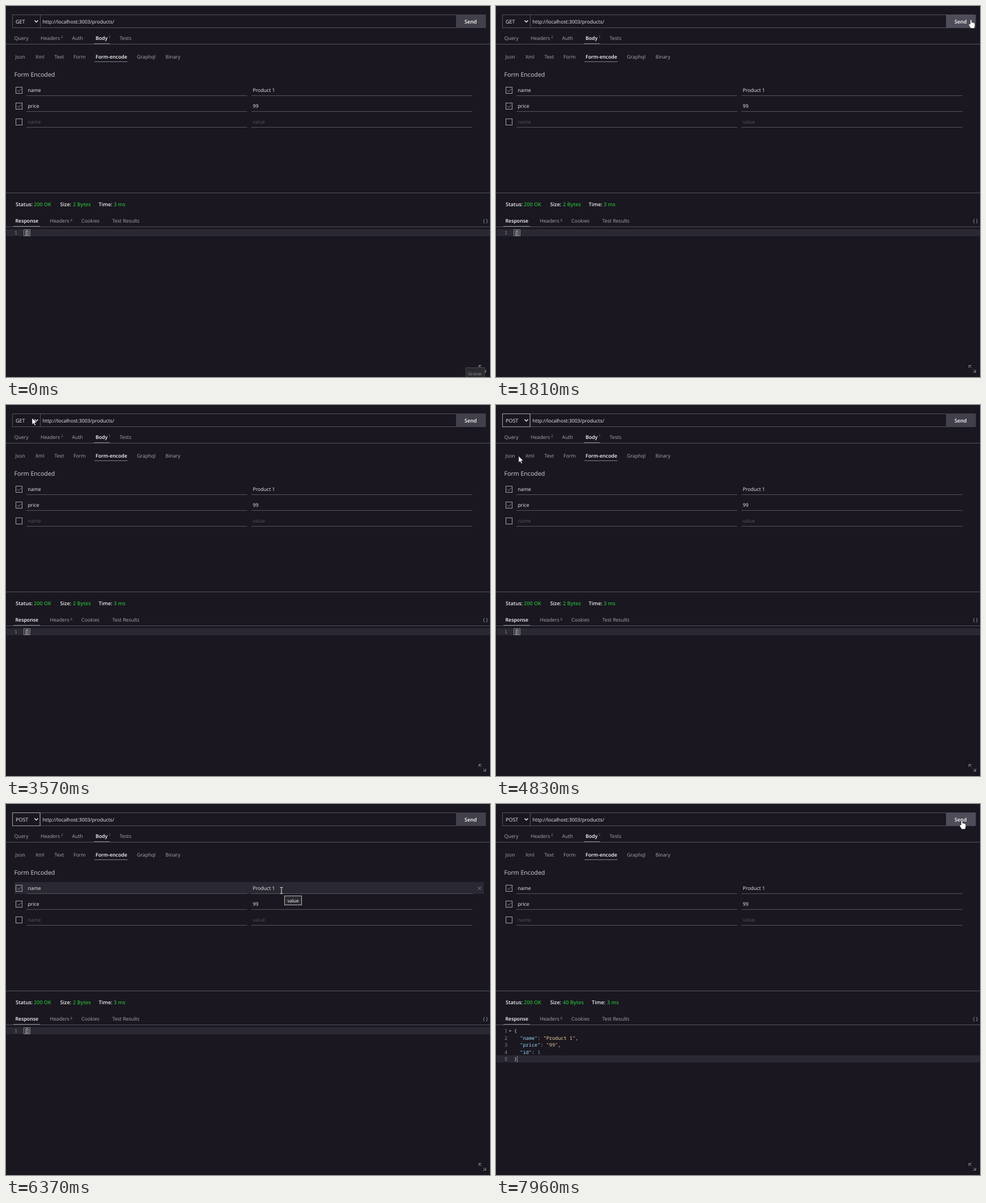
These frames come from a looping animation (854x656 px, 8000 ms). An HTML page:

```html
<!DOCTYPE html>
<html lang="en">
<head>
<meta charset="utf-8">
<title>REST client</title>
<style>
  html, body { margin: 0; width: 100%; height: 100%; overflow: hidden; background: #1a1720; }
  svg { display: block; width: 854px; height: 656px; }
  text { font: 8.75px "Open Sans", "Noto Sans", sans-serif; fill: #a9a7ae; text-rendering: geometricPrecision; white-space: pre; }
  .on { font-weight: 600; fill: #fff; }
  .sup { font-size: 6.5px; fill: #8b8991; }
  .title { font-size: 10.65px; fill: #d8d7da; }
  .field { font-size: 8.7px; fill: #f2f2f2; }
  .hint { font-size: 8.7px; fill: #56545c; }
  .status { font-size: 9.1px; font-weight: 600; fill: #eee; }
  .ok { fill: #25b035; }
  .code text { font: 8.58px "Noto Sans Mono", "DejaVu Sans Mono", monospace; fill: #dcdcdc; }
  .code .num { fill: #8a888f; }
  .key { fill: #9cdcfe; }
  .str { fill: #ecd0a0; }
  .int { fill: #6fa3d8; }
  .line { fill: none; stroke: #55535b; }
  .mark { fill: none; stroke: #807e86; }
  .box { fill: none; stroke: #a3a1a8; }
  .band { fill: #2a2832; }
  .thin { fill: none; stroke: #8b8991; }
</style>
</head>
<body>
<svg viewBox="0 0 854 656">
  <rect width="854" height="656" fill="#1a1720"/>

  <!-- request bar -->
  <path class="line" d="M11.5 15.5H846V38.5H11.5ZM60.5 15.5V38.5"/>
  <rect id="focus" class="box" x="11.5" y="15.5" width="48.5" height="23"/>
  <text id="method" class="field" x="17" y="31" style="font-size:9px">GET</text>
  <path d="M50.5 25.5l3 3 3-3" fill="none" stroke="#eee" stroke-width="1.5"/>
  <text class="field" x="64.5" y="30.5">http://localhost:3003/products/</text>
  <rect id="send" x="794" y="15" width="52" height="24"/>
  <text class="on" x="809" y="30.5" style="font-size:9.1px">Send</text>

  <!-- request tabs -->
  <path class="line" d="M0 67.5H854M0 330.5H854"/>
  <path class="mark" d="M155 66.5H183M156 98.5H214.5"/>
  <g id="tabs"></g>
  <text class="sup" x="97" y="57">2</text>
  <text class="sup" x="181" y="57">1</text>
  <text class="title" x="14.5" y="125">Form Encoded</text>
  <g id="rows"></g>

  <!-- response -->
  <g id="response">
    <text id="status" class="status" y="354"></text>
    <path class="line" d="M0 390.5H854"/>
    <path class="mark" d="M13 389.5H60"/>
    <text class="on" x="16.5" y="383">Response</text>
    <text x="77.5" y="383">Headers</text>
    <text class="sup" x="113.5" y="380.5">6</text>
    <text x="133" y="383">Cookies</text>
    <text x="187.5" y="383">Test Results</text>
    <text x="841.5" y="383">{ }</text>
    <g id="empty" class="code">
      <rect class="band" x="1" y="394.5" width="853" height="12.5"/>
      <text class="num" x="15" y="404">1</text>
      <text x="32" y="404">[]</text>
      <path class="thin" d="M42.5 395V407"/>
      <path id="match" class="thin" d="M31.5 395.5H36.5V406.5H31.5ZM37.5 395.5H42.5V406.5H37.5Z"/>
    </g>
    <g id="created" class="code">
      <rect class="band" x="1" y="444.5" width="853" height="12.5"/>
      <path d="M22.5 400h5l-2.500 3z" fill="#8a888f"/>
      <path class="thin" d="M37.500 445V457"/>
    </g>
    <path class="thin" d="M834.500 640V635.500H839M835 636l4 4M842 643l4 4M846.500 643V647.500H842"/>
  </g>

  <!-- overlays -->
  <g id="menu">
    <rect x="11.500" y="39.500" width="76" height="136" fill="#1a1720" stroke="#55535b"/>
    <rect id="pick" class="band" x="12" width="75" height="19.500"/>
  </g>
  <g id="tip">
    <rect x="491.500" y="162.500" width="30" height="16" fill="#2b2a2e" stroke="#b9b8bb"/>
    <text x="496.500" y="174" style="font-size:8.1px;fill:#fff">value</text>
  </g>
  <g id="record">
    <rect x="811.500" y="639.500" width="33" height="18" fill="#2b2a2e" stroke="#48464d"/>
    <text x="815" y="653" style="font-size:8px;fill:#8f8d94">Gravar</text>
  </g>
  <g id="cursor">
    <path id="arrow" d="M0 0V11.500L2.700 9 4.500 13.200 6.400 12.400 4.600 8.400H8.200Z" fill="#fff" stroke="#111" stroke-width=".6"/>
    <path id="beam" d="M-2.500 -5.500H-.7L0 -5 .7 -5.500H2.500M0 -5V5M-2.500 5.500H-.7L0 5 .7 5.500H2.500" fill="none" stroke="#eee"/>
    <path id="hand" d="M-1.300 8V.8Q0 -.8 1.300 .8V5Q2.600 4.300 3.500 5.500 4.800 4.900 5.500 6.100 7 5.700 7 7.300V10.500Q7 12.500 5.700 15.500H-.6Q-1.600 13 -4 9.800 -4.500 8.100 -3 8Z" fill="#fff" stroke="#111" stroke-width=".6"/>
  </g>
</svg>
<script>
const LOOP = 8000;
const $ = id => document.getElementById(id);
const show = (id, on) => { $(id).style.display = on ? '' : 'none'; };
const label = (text, x, y, cls = '') => `<text class="${cls}" x="${x}" y="${y}">${text}</text>`;
const span = (cls, text) => `<tspan class="${cls}">${text}</tspan>`;

const tabRow = (y, items) => items.map(([text, x, cls]) => label(text, x, y, cls)).join('');
$('tabs').innerHTML =
  tabRow(59.5, [['Query', 14.5], ['Headers', 61], ['Auth', 116.5], ['Body', 158, 'on'], ['Tests', 200.5]]) +
  tabRow(92.5, [['Json', 16.5], ['Xml', 52], ['Text', 85.5], ['Form', 119], ['Form-encode', 158, 'on'],
    ['Graphql', 231], ['Binary', 281.5]]);

const ROW_TOP = 138, ROW_STEP = 28, ROW_HEIGHT = 21;
$('rows').innerHTML = [['name', 'Product 1'], ['price', '99'], ['name', 'value']].map(([key, value], i) => {
  const y = ROW_TOP + i * ROW_STEP, cls = i < 2 ? 'field' : 'hint';
  return `<g id="hover${i}"><rect class="band" x="15" y="${y}" width="828" height="${ROW_HEIGHT}"/>
    <path class="thin" d="M832.5 ${y + 8}l6 6m0 -6l-6 6"/></g>
    <path class="line" d="M36 ${y + 20.5}H425.5M433 ${y + 20.5}H823"/>
    <rect class="box" x="17.5" y="${y + 5.5}" width="11" height="11"/>
    ${i < 2 ? `<path class="thin" d="M20 ${y + 11}l2.500 2.500 4.500 -5"/>` : ''}
    ${label(key, 38.5, y + 14, cls)}${label(value, 435.5, y + 14, cls)}`;
}).join('');

const member = (key, value, cls, end) => `  ${span('key', `"${key}"`)}: ${span(cls, value)}${end}`;
$('created').innerHTML += [
  '{', member('name', '"Product 1"', 'str', ','), member('price', '"99"', 'str', ','), member('id', 1, 'int', ''), '}'
].map((text, i) => label(i + 1, 15, 404 + i * 12.5, 'num') + label(text, 32, 404 + i * 12.5)).join('');

const OPTION = 136 / 7;
$('menu').innerHTML += ['GET', 'POST', 'PUT', 'DELETE', 'PATCH', 'HEAD', 'OPTIONS']
  .map((name, i) => label(name, 17, 52.5 + i * OPTION, 'field')).join('');

const statusLine = (size, timeX, valueX) => [
  ['Status:', 17], ['200 OK', 49, 'ok'], ['Size:', 95.5], [size, 118, 'ok'], ['Time:', timeX], ['3 ms', valueX, 'ok']
].map(([text, x, cls = '']) => `<tspan class="${cls}" x="${x}">${text}</tspan>`).join('');
const STATUS = [statusLine('2 Bytes', 163.5, 190), statusLine('40 Bytes', 169, 196)];

// Pointer stops: time, x, y
const path = [
  [0, 640, 670], [210, 640, 670], [470, 480, 260], [770, 300, -20],
  [990, 130, -18], [1200, 230, 30], [1500, 600, 36], [1790, 838, 24], [1810, 838, 24],
  [1890, 846, 24], [2070, 846, 24], [2320, 827, 24], [2720, 827, 24],
  [3000, 480, 34], [3350, 24, 39], [3570, 46, 23], [3910, 46, 23],
  [4020, 44, 45], [4150, 40, 66], [4220, 40, 66], [4400, 46, 25], [4560, 46, 25],
  [4830, 40, 90], [5080, 18, 150], [5350, 260, 176], [5600, 420, 172], [5840, 486, 153],
  [6800, 486, 153], [7150, 640, 100], [7500, 822, 29], [LOOP, 822, 29]
];

const still = (a, b) => !a || !b || (a[1] === b[1] && a[2] === b[2]);
function slope(i, k) {
  const before = path[i - 1], here = path[i], after = path[i + 1];
  if (still(before, here) || still(here, after)) return 0;
  return (after[k] - before[k]) / (after[0] - before[0]);
}
function pointer(t) {
  const i = path.findIndex(p => p[0] > t) - 1;
  const a = path[i], b = path[i + 1], d = b[0] - a[0], u = (t - a[0]) / d, w = 1 - u;
  return [1, 2].map(k =>
    w * w * ((1 + 2 * u) * a[k] + u * d * slope(i, k)) +
    u * u * ((3 - 2 * u) * b[k] - w * d * slope(i + 1, k)));
}

const within = (v, from, to) => v >= from && v < to;
let shownStatus = -1;

function draw(t) {
  const [x, y] = pointer(t);
  const inBar = within(y, 15, 39);
  const onSend = inBar && within(x, 794, 848);
  const row = Math.floor((y - ROW_TOP) / ROW_STEP);
  const onRow = within(row, 0, 3) && (y - ROW_TOP) % ROW_STEP < ROW_HEIGHT && within(x, 15, 843);
  const onText = (inBar && within(x, 60, 794)) || (onRow && (within(x, 36, 426) || within(x, 433, 823)));

  $('cursor').setAttribute('transform', `translate(${x.toFixed(2)} ${y.toFixed(2)})`);
  show('hand', onSend);
  show('beam', onText);
  show('arrow', !onSend && !onText);
  for (let i = 0; i < 3; i++) show('hover' + i, onRow && row === i);

  const lit = onSend && (t < 4000 || t >= 7800);
  $('send').setAttribute('fill', lit ? '#4e4d59' : '#41404b');
  $('method').textContent = t < 4200 ? 'GET' : 'POST';
  show('focus', within(t, 3910, 7800));
  show('menu', within(t, 3910, 4200));
  const option = Math.floor((y - 39.5) / OPTION);
  $('pick').setAttribute('y', 39.5 + Math.max(0, option) * OPTION);

  show('tip', within(t, 6370, 6800));
  show('record', t < 20);

  const done = t >= 7900;
  show('response', !within(t, 2580, 2640) && !within(t, 7820, 7900));
  show('empty', !done);
  show('created', done);
  show('match', !within(t, 2560, 2780));
  if (shownStatus !== +done) $('status').innerHTML = STATUS[shownStatus = +done];
}

const start = performance.now();
function tick() {
  draw((performance.now() - start) % LOOP);
  requestAnimationFrame(tick);
}
tick();
</script>
</body>
</html>
```
